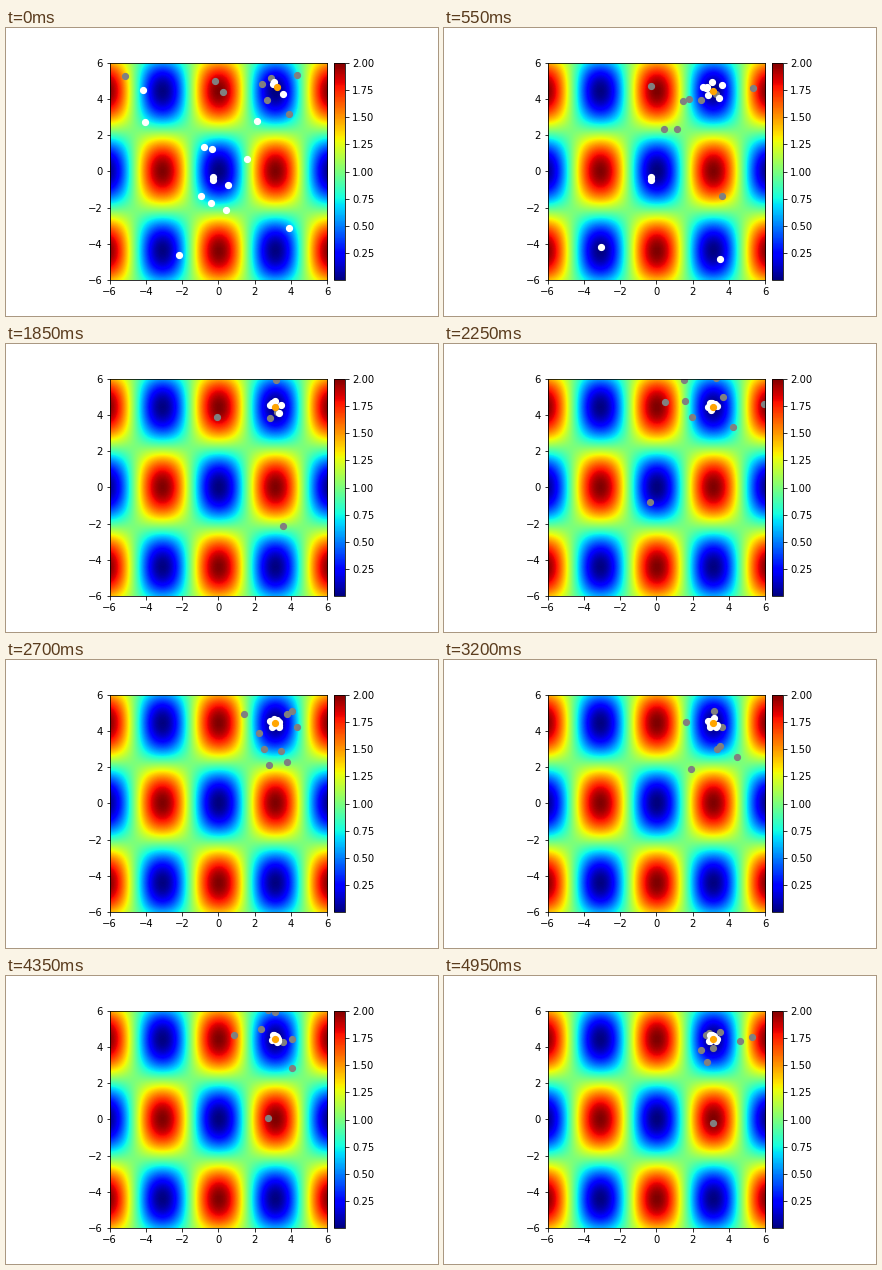
Recreate the animation shown at these times as a matplotlib script. Size 432 by 288 pixels, loop 5 s.

```python
import numpy as np
import matplotlib.pyplot as plt
from matplotlib.animation import FuncAnimation
from mpl_toolkits.axes_grid1 import make_axes_locatable

W, H, DPI = 432, 288, 72
FRAMES, INTERVAL = 100, 50
LIM = 6
FIRST_BEST = np.array([3.24, 4.65])
BEST = np.array([3.13, 4.43])
TRIALS, CLUSTER, LIFE = 10, 8, 16

# Scattered starting nests, abandoned one after another
START = [(-4.05, 2.72), (0.43, -2.14), (-0.97, -1.37), (-0.35, 1.23),
         (-0.40, -1.75), (-2.17, -4.62), (-4.15, 4.50), (2.13, 2.78),
         (1.60, 0.67), (-0.80, 1.34), (3.90, -3.14), (0.53, -0.75)]

# Nests in side minima that hold out longer: x, y, first frame, last frame
HOLDOUTS = [(-0.28, -0.30, 0, 19), (-0.28, -0.48, 0, 15),
            (-3.05, -4.18, 4, 31), (3.52, -4.84, 6, 17)]


def griewank(x, y):
    return 1 + (x**2 + y**2) / 4000 - np.cos(x) * np.cos(y / np.sqrt(2))


def best_at(i):
    return FIRST_BEST if i < 3 else BEST


def cluster_nest(slot, i):
    """Nest close to the optimum, replaced by a nearer one every LIFE frames."""
    age = i + 5 * slot
    rng = np.random.default_rng([slot, age // LIFE])
    born = max(0, i - age % LIFE)
    radius = (0.2 + 0.3 * 0.97**born) * rng.uniform(0.7, 1.2)
    angle = rng.uniform(0, 2 * np.pi)
    return BEST + radius * np.array([np.cos(angle), np.sin(angle)])


def nests_at(i):
    held = [(x, y) for x, y, first, last in HOLDOUTS if first <= i <= last]
    close = [cluster_nest(k, i) for k in range(min(3 + i, CLUSTER))]
    return START[2 * i:] + held + close


def trials_at(i):
    """Heavy-tailed steps around the best nest, shorter towards the end."""
    rng = np.random.default_rng(500 + i)
    u, v = rng.normal(size=(2, TRIALS, 2))
    scale = 1.1 - 0.7 * (i / FRAMES) ** 2
    return best_at(i) + scale * u / np.abs(v) ** (1 / 1.5)


plt.rcParams.update({"font.family": "DejaVu Sans", "font.size": 10})
fig, ax = plt.subplots(figsize=(W / DPI, H / DPI), dpi=DPI, facecolor="white")
fig.subplots_adjust(left=0.125, right=0.9, bottom=0.125, top=0.88)
cax = make_axes_locatable(ax).append_axes("right", size="5%", pad=0.1)

grid = np.linspace(-LIM, LIM, 100)
field = griewank(*np.meshgrid(grid, grid))
image = ax.imshow(field, cmap="jet", origin="lower", interpolation="bilinear",
                  extent=(-LIM, LIM, -LIM, LIM))
fig.colorbar(image, cax=cax, ticks=np.arange(0.25, 2.01, 0.25))
ax.set(xlim=(-LIM, LIM), ylim=(-LIM, LIM),
       xticks=range(-6, 7, 2), yticks=range(-6, 7, 2))


def dots(color, z):
    return ax.scatter([], [], s=36, color=color, linewidths=1.2, zorder=z)


trials, nests, best = dots("gray", 2), dots("white", 2.1), dots("orange", 2.2)


def update(i):
    trials.set_offsets(trials_at(i))
    nests.set_offsets(nests_at(i))
    best.set_offsets([best_at(i)])
    return trials, nests, best


anim = FuncAnimation(fig, update, frames=FRAMES, interval=INTERVAL,
                     repeat=True, repeat_delay=0)
plt.show()
```
